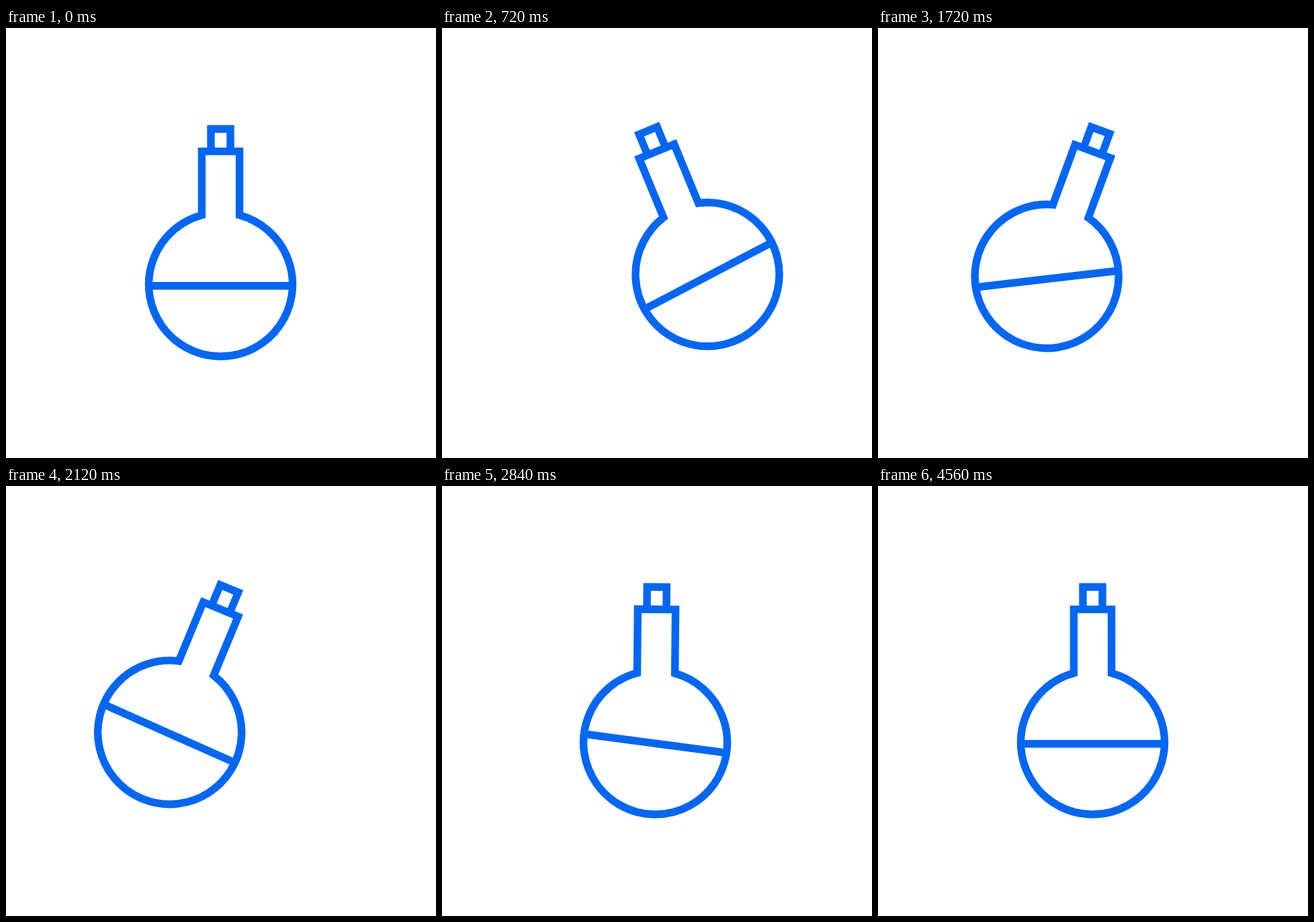
An HTML page for the animation above (4680 ms loop, 640 by 640 pixels).

```html
<!DOCTYPE html>
<html lang="en">
<head>
<meta charset="utf-8">
<title>Swinging flask</title>
<style>
  html, body { margin: 0; width: 100%; height: 100%; overflow: hidden; background: #fff; }
  svg { display: block; width: 100%; height: 100%; }
</style>
</head>
<body>
<svg viewBox="0 0 640 640" fill="none" stroke="#0066f5" stroke-width="11.4">
  <clipPath id="bowl"><circle cx="319.5" cy="381.7" r="108"/></clipPath>
  <g id="flask">
    <path d="M305 183.6V150.3H334V183.6"/>
    <path d="M291.4 278.5V183.6H347.6V278.5A107 107 0 1 1 291.4 278.5Z"/>
    <g clip-path="url(#bowl)"><path id="liquid" d="M190 383.7H460"/></g>
  </g>
  <g id="bubbles" fill="#0066f5" stroke="none"><circle/><circle/><circle/></g>
</svg>
<script>
const LOOP = 4680, STEP = 40, SURFACE = 383.7;
const flask = document.getElementById('flask');
const liquid = document.getElementById('liquid');
const dots = document.querySelectorAll('#bubbles circle');

// Each key: time, angle (clockwise), then the ease x1 and x2 that lead to it
const swing = [[0, 0], [1000, -24.1, .91, .21], [2000, 24.1, .54, .33], [3000, 0, .28, .36]];
const slosh = [[460, 0], [1510, -30, .35, .5], [2500, 10, .5, .4], [3440, 0, .33, .67]];
const bubbles = [
  { x: 295, start: 3388, rise: 51 },
  { x: 350, start: 3690, rise: 55 },
  { x: 256.5, start: 3980, rise: 50 }
];
const LIFE = 570;

// Cubic bezier (x1, 0, x2, 1), solved by bisection
function ease(x, x1, x2) {
  let lo = 0, hi = 1, p = .5;
  for (let i = 0; i < 24; i++) {
    p = (lo + hi) / 2;
    const q = 1 - p;
    if (3 * p * q * q * x1 + 3 * p * p * q * x2 + p ** 3 < x) lo = p; else hi = p;
  }
  return p * p * (3 - 2 * p);
}

function valueAt(keys, t) {
  if (t <= keys[0][0]) return keys[0][1];
  for (let i = 1; i < keys.length; i++) {
    const [t0, v0] = keys[i - 1], [t1, v1, x1, x2] = keys[i];
    if (t < t1) return v0 + (v1 - v0) * ease((t - t0) / (t1 - t0), x1, x2);
  }
  return keys[keys.length - 1][1];
}

function draw(now) {
  const t = Math.floor(now % LOOP / STEP) * STEP;
  flask.setAttribute('transform', `rotate(${valueAt(swing, t)} 319.5 183.6)`);
  liquid.setAttribute('transform', `rotate(${valueAt(slosh, t)} 324.5 ${SURFACE})`);
  bubbles.forEach(({ x, start, rise }, i) => {
    const p = (t - start) / LIFE;
    dots[i].setAttribute('cx', x);
    dots[i].setAttribute('cy', SURFACE - rise * p);
    dots[i].setAttribute('r', p > 0 && p < 1 ? 5.6 + 2 * p : 0);
  });
}

const begin = performance.now();
function tick() {
  draw(performance.now() - begin);
  requestAnimationFrame(tick);
}
tick();
</script>
</body>
</html>
```
